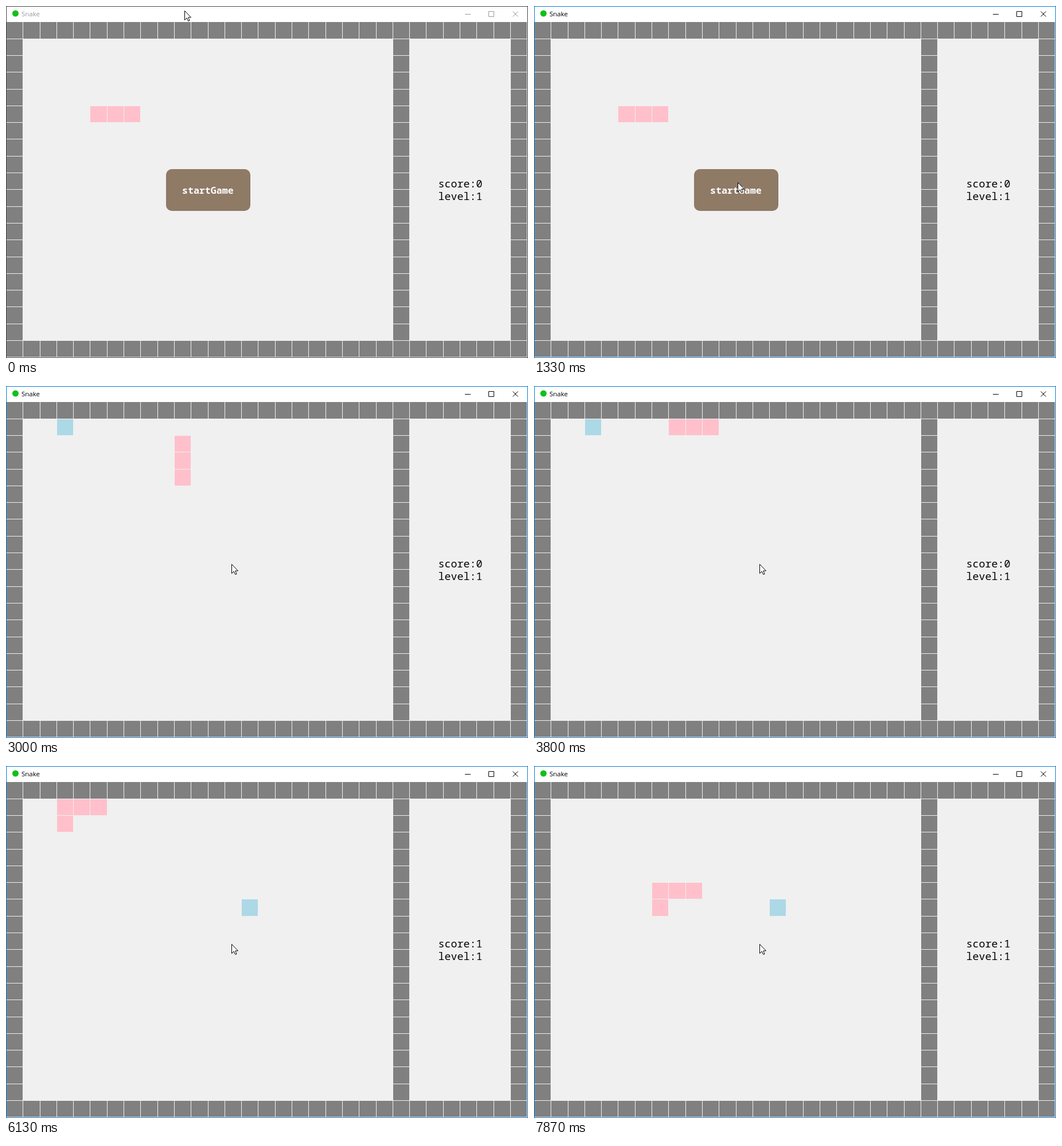
An HTML page with a canvas for the animation above (8000 ms loop, 910 by 615 pixels).

```html
<!DOCTYPE html>
<html lang="en">
<head>
<meta charset="utf-8">
<title>Snake</title>
<style>
html, body { margin: 0; width: 100%; height: 100%; overflow: hidden; }
canvas { display: block; }
</style>
</head>
<body>
<canvas id="stage" width="910" height="615"></canvas>
<script>
const ctx = document.getElementById('stage').getContext('2d');
const LOOP = 8000, FOCUS = 1330, START = 1400, EAT = 5870;
const MONO = '"Noto Sans Mono", "DejaVu Sans Mono", monospace';
const DIRS = { R: [1, 0], L: [-1, 0], U: [0, -1], D: [0, 1] };

// [time, steps taken at that time]
const MOVES = [
  [1400, 'R'], [1800, 'R'], [2200, 'R'], [2530, 'U'], [2600, 'U'], [3000, 'U'],
  [3400, 'U'], [3670, 'L'], [3800, 'L'], [4200, 'L'], [4670, 'L'], [5070, 'L'],
  [5470, 'L'], [5870, 'L'], [6130, 'D'], [6270, 'D'], [6400, 'R'], [6600, 'D'],
  [6670, 'D'], [6800, 'R'], [7000, 'D'], [7070, 'D'], [7200, 'R'], [7470, 'R'],
  [7670, 'U'], [7870, 'RR']
];

// Pointer path: [time, x, y]
const POINTER = [[67, 311, 8], [933, 350, 285], [1333, 355, 308], [1600, 393, 311]];

function cell(col, row, color) {
  const x = 0.9 + 29.3 * col, y = 28.3 + 29.3 * row;
  const left = Math.round(x), top = Math.round(y);
  ctx.fillStyle = color;
  ctx.fillRect(left, top, Math.round(x + 28.3) - left, Math.round(y + 28.3) - top);
}

function text(str, x, y, font, color) {
  ctx.font = font;
  ctx.fillStyle = color;
  ctx.fillText(str, x, y);
}

function snakeAt(t) {
  const body = [[5, 5], [6, 5], [7, 5]];
  for (const [time, steps] of MOVES) {
    if (time > t) break;
    for (const s of steps) {
      const [x, y] = body[body.length - 1];
      body.push([x + DIRS[s][0], y + DIRS[s][1]]);
      if (time !== EAT) body.shift();
    }
  }
  return body;
}

function pointerAt(t) {
  t = Math.floor((t + 5) * 0.015) / 0.015; // 15 updates a second
  let prev = POINTER[0];
  if (t <= prev[0]) return prev.slice(1);
  for (const next of POINTER) {
    if (t < next[0]) {
      const p = (t - prev[0]) / (next[0] - prev[0]);
      const e = p * p * (3 - 2 * p);
      return [1, 2].map(i => Math.round(prev[i] + (next[i] - prev[i]) * e));
    }
    prev = next;
  }
  return prev.slice(1);
}

function drawWindow(active) {
  ctx.fillStyle = active ? '#0078d7' : '#444';
  ctx.fillRect(0, 0, 910, 615);
  ctx.fillStyle = '#fff';
  ctx.fillRect(1, 1, 908, 27);
  ctx.fillStyle = '#f0f0f0';
  ctx.fillRect(1, 28, 908, 586);

  ctx.fillStyle = '#0fc01a';
  ctx.beginPath();
  ctx.arc(16.5, 13, 5.5, 0, 7);
  ctx.fill();

  const ink = active ? '#000' : '#999';
  text('Snake', 27, 18, '11.5px "Open Sans", sans-serif', ink);
  ctx.strokeStyle = ink;
  ctx.lineWidth = 1;
  ctx.stroke(new Path2D('M800 14.5h10M841.5 9.5h9v9h-9zM883.5 9.5l9 9M892.5 9.5l-9 9'));
}

function drawWalls() {
  for (let col = 0; col < 31; col++)
    for (let row = 0; row < 20; row++)
      if (row % 19 === 0 || col === 0 || col === 23 || col === 30) cell(col, row, '#808080');
}

function drawButton() {
  ctx.fillStyle = '#8f7a66';
  ctx.beginPath();
  ctx.roundRect(279, 285, 147, 73, 10);
  ctx.fill();
  text('startGame', 307, 328, 'bold 16.6px ' + MONO, '#fff');
}

function drawPointer([x, y]) {
  ctx.save();
  ctx.translate(x + 0.5, y + 0.5);
  const arrow = new Path2D('M0 0V16L3.7 12.4L6.3 17.8L8.6 16.8L6.2 11.4H11Z');
  ctx.fillStyle = '#fff';
  ctx.fill(arrow);
  ctx.strokeStyle = '#000';
  ctx.stroke(arrow);
  ctx.restore();
}

function draw(t) {
  drawWindow(t >= FOCUS);
  drawWalls();
  if (t < START) drawButton();
  else if (t < EAT) cell(3, 1, '#add8e6');
  else cell(14, 7, '#add8e6');
  for (const [col, row] of snakeAt(t)) cell(col, row, '#ffc0cb');
  const font = '18.33px ' + MONO;
  text('score:' + (t < EAT ? 0 : 1), 753.5, 317, font, '#000');
  text('level:1', 753.5, 339, font, '#000');
  drawPointer(pointerAt(t));
}

const begin = performance.now();
function tick() {
  draw((performance.now() - begin) % LOOP);
  requestAnimationFrame(tick);
}
tick();
</script>
</body>
</html>
```
